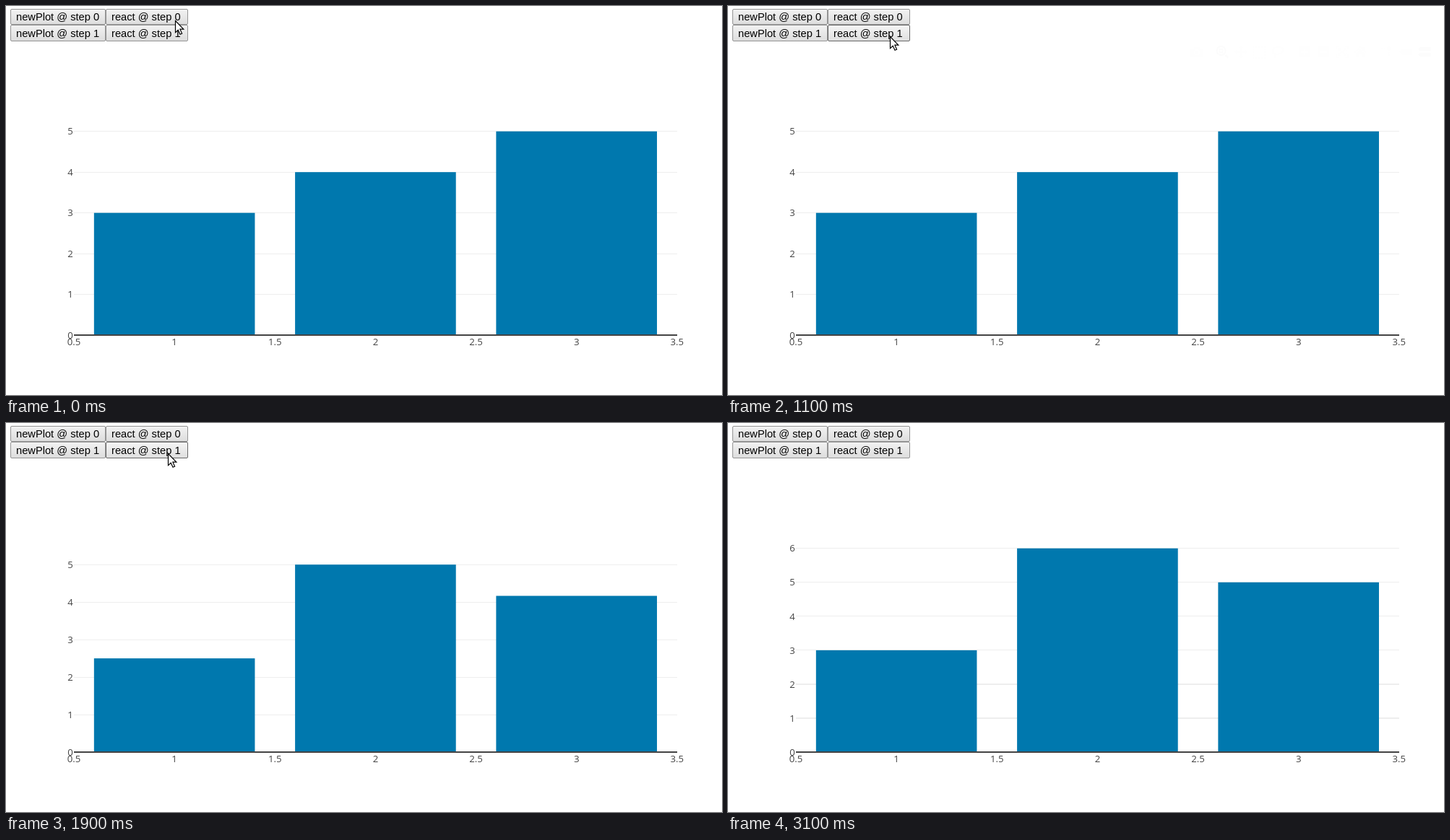
Animation of 991 by 539 pixels, one loop 3700 ms. Source, as an HTML page with a canvas:

```html
<!DOCTYPE html>
<html lang="en">
<head>
<meta charset="utf-8">
<title>Bar chart transition</title>
<style>
  html, body { margin: 0; width: 100%; height: 100%; overflow: hidden; background: #fff; }
  canvas { display: block; }
</style>
</head>
<body>
<canvas id="stage" width="991" height="539"></canvas>
<script>
const ctx = document.getElementById('stage').getContext('2d');
const LOOP = 3700, STEP = 100;
const LEFT = 94, RIGHT = 929, BASE = 456.05, HEIGHT = 297.2;
const X_UNIT = 278.27, HALF_LINE = 0.58;
const RANGE_A = 5 / 0.95, RANGE_B = 6 / 0.95;

const circle = (x, y, r) => `M${x - r} ${y}a${r} ${r} 0 1 0 ${2 * r} 0a${r} ${r} 0 1 0 ${-2 * r} 0z`;
const rect = (x, y, w, h) => `M${x} ${y}h${w}v${h}h${-w}z`;
const dots = (side, n) => {
  let d = '';
  for (let i = 0; i < n; i++) for (let j = 0; j < n; j++)
    if (i % (n - 1) === 0 || j % (n - 1) === 0) d += rect(-9 + i * side, -8.5 + j * side, 2.4, 2.4);
  return d;
};

// Toolbar icons: centre x, outline around (0, 0), active flag
const icons = [
  [649, 'M-9-4.5h4.5l1.5-2.3h6l1.5 2.3h4.5v11h-18z' + circle(0, 0.8, 4.2) + circle(0, 0.8, 2.4)],
  [684, circle(-1.5, -1.5, 7.2) + circle(-1.5, -1.5, 5) + rect(-4.3, -4.3, 5.6, 5.6) +
        rect(-2.9, -2.9, 2.8, 2.8) + 'M3.6 5.2l1.6-1.6 4 3.6-2 2z', true],
  [710, 'M0-9l3.2 3.6h-2v4.2h4.2v-2l3.6 3.2-3.6 3.2v-2h-4.2v4.2h2l-3.2 3.6-3.2-3.6h2v-4.2h-4.2v2l-3.6-3.2 3.6-3.2v2h4.2v-4.2h-2z'],
  [735, dots(3.9, 5)],
  [761, 'M-8.5-1.5C-8.5-9 8.5-10 8.5-2.5C8.5 4-1 5-3.5 3.5Q-1 6-4 9l-1.2-1.2Q-3.5 6-6 4Q-8.5 2-8.5-1.5z' +
        'M-6.5-1.5C-6-7 6.5-7.5 6.5-2.5C6.5 2-2 3-4 1.5Q-6.5 1-6.5-1.5z'],
  [798, rect(-8, -7.5, 16, 15) + 'M-1.3-5h2.6v3.7h3.7v2.6h-3.7v3.7h-2.6v-3.7h-3.7v-2.6h3.7z'],
  [824, rect(-8, -7.5, 16, 15) + rect(-5, -1.3, 10, 2.6)],
  [850, 'M-9-8.5h5v1.6h-3.4v3.4h-1.6zM9-8.5v5h-1.6v-3.4h-3.4v-1.6zM-9 8.5v-5h1.6v3.4h3.4v1.6zM9 8.5h-5v-1.6h3.4v-3.4h1.6z' +
        'M-6-5.5h4l-1.2 1.2 3.2 3 3.2-3-1.2-1.2h4v4l-1.3-1.2-2.9 2.7 2.9 2.7 1.3-1.2v4h-4l1.2-1.2-3.2-3-3.2 3 1.2 1.2h-4v-4l1.3 1.2 2.9-2.7-2.9-2.7-1.3 1.2z'],
  [875, 'M0-7.5l3.5 3.3v-2.3h2.3v4.4l3 2.8-1.2 1.3-7.6-6.8-7.6 6.8-1.2-1.3zM-6 1.6l6-5.2 6 5.2v5.4h-4.2v-4.2h-3.6v4.2h-4.2z'],
  [911, rect(-7, -5.5, 2.2, 2.2) + rect(-3, -5.5, 2.2, 2.2) + circle(3.5, -4.5, 2.8) +
        rect(2.4, 0, 2.2, 2.2) + rect(2.4, 3.6, 2.2, 2.2)],
  [938, 'M-9 .2l5-4.6h13v9.2h-13z'],
  [964, 'M-9-3.8l3-2.8h14.5v5.4h-14.5zM-9 3.8l3-2.6h14.5v5.4h-14.5z', true]
].map(([x, d, active]) => ({ x, path: new Path2D(d), active }));

const arrow = new Path2D('M.5.5V16.7L4.2 13.2 7 19.3 9.6 18.2 6.9 12.2H11.8z');

const buttons = [
  { x: 6, y: 4, w: 132, h: 22, label: 'newPlot @ step 0' },
  { x: 138, y: 4, w: 114, h: 22, label: 'react @ step 0' },
  { x: 6, y: 26, w: 132, h: 23, label: 'newPlot @ step 1' },
  { x: 138, y: 26, w: 114, h: 23, label: 'react @ step 1' }
];

// Pointer stops: from time, x, y
const pointer = [
  [0, 234, 20], [100, 232, 17], [500, 231, 25], [600, 229, 50], [700, 228, 62], [800, 227, 61],
  [900, 225, 54], [1000, 225, 46], [1100, 224, 42], [2900, 120, 14], [3000, 70, 1], [3100, -50, -50]
];
// Toolbar opacity: from time, value
const fade = [[0, 0], [600, 0.12], [700, 0.61], [800, 1], [900, 0.85], [1000, 0.3], [1100, 0.025], [1600, 0]];

const at = (list, t) => list.findLast(stop => stop[0] <= t);

function axisProgress(t) {
  if (t >= 2100) return 1;
  const p = Math.max(0, (t - 1603.6) / 622);
  return p < 0.5 ? 4 * p ** 3 : 1 - 4 * (1 - p) ** 3;
}

function drawButton(b, hover, pressed) {
  const g = ctx.createLinearGradient(0, b.y, 0, b.y + b.h);
  g.addColorStop(0, pressed ? '#dcdcdc' : hover ? '#f6f6f6' : '#f3f3f3');
  g.addColorStop(1, pressed ? '#e8e8e8' : hover ? '#dedede' : '#dcdcdc');
  ctx.beginPath();
  ctx.roundRect(b.x + 0.5, b.y + 0.5, b.w - 1, b.h - 1, 1.5);
  ctx.fillStyle = g;
  ctx.fill();
  ctx.strokeStyle = hover ? '#686868' : '#949494';
  ctx.lineWidth = 1;
  ctx.stroke();
  ctx.font = '14.67px "Liberation Sans", Arial, sans-serif';
  ctx.textAlign = 'left';
  ctx.fillStyle = '#000';
  ctx.fillText(b.label, b.x + 8, b.y < 20 ? 20 : 43);
}

function drawChart(t) {
  const unit = HEIGHT / (RANGE_A + (RANGE_B - RANGE_A) * axisProgress(t));
  const values = t < 1700 ? [3, 4, 5] : [3, 6, 5];
  // The new bars keep the old scale until the axis has settled
  const scale = t >= 1700 && t < 2400 ? RANGE_A / RANGE_B : 1;

  ctx.font = '13.2px "Open Sans", sans-serif';
  for (let n = 0; n * unit <= HEIGHT; n++) {
    const y = BASE - n * unit;
    if (n) {
      const top = Math.round(y - HALF_LINE);
      ctx.fillStyle = '#eee';
      ctx.fillRect(LEFT, top, RIGHT - LEFT, Math.round(y + HALF_LINE) - top);
    }
    ctx.fillStyle = '#444';
    ctx.textAlign = 'right';
    ctx.fillText(n, 92.8, y + 4.7);
  }

  ctx.fillStyle = '#0078ae';
  values.forEach((v, i) => {
    const h = v * scale * unit;
    ctx.fillRect(LEFT + (i + 0.1) * X_UNIT, BASE - h, 0.8 * X_UNIT, h);
  });

  ctx.fillStyle = '#444';
  ctx.fillRect(LEFT, 455, RIGHT - LEFT, 2);
  ctx.textAlign = 'center';
  for (let v = 0.5; v <= 3.5; v += 0.5)
    ctx.fillText(v, LEFT + (v - 0.5) * X_UNIT, 470);
}

function drawToolbar(opacity) {
  for (const { x, path, active } of icons) {
    ctx.save();
    ctx.translate(x, 63.5);
    ctx.globalAlpha = opacity * (active ? 0.7 : 0.3);
    ctx.fillStyle = '#444';
    ctx.fill(path, 'evenodd');
    ctx.restore();
  }
}

function drawPointer(x, y) {
  ctx.save();
  ctx.translate(x, y);
  ctx.fillStyle = '#fff';
  ctx.strokeStyle = '#000';
  ctx.lineWidth = 1.2;
  ctx.fill(arrow);
  ctx.stroke(arrow);
  ctx.restore();
}

function draw(t) {
  const [, px, py] = at(pointer, t);
  ctx.fillStyle = '#fff';
  ctx.fillRect(0, 0, 991, 539);
  drawChart(t);
  drawToolbar(at(fade, t)[1]);
  for (const b of buttons) {
    const over = px >= b.x && px < b.x + b.w && py >= b.y && py < b.y + b.h;
    drawButton(b, over && t >= STEP, over && t === 1600);
  }
  drawPointer(px, py);
}

const start = performance.now();
function tick() {
  const t = (performance.now() - start) % LOOP;
  draw(Math.floor(t / STEP) * STEP);
  requestAnimationFrame(tick);
}
tick();
</script>
</body>
</html>
```
